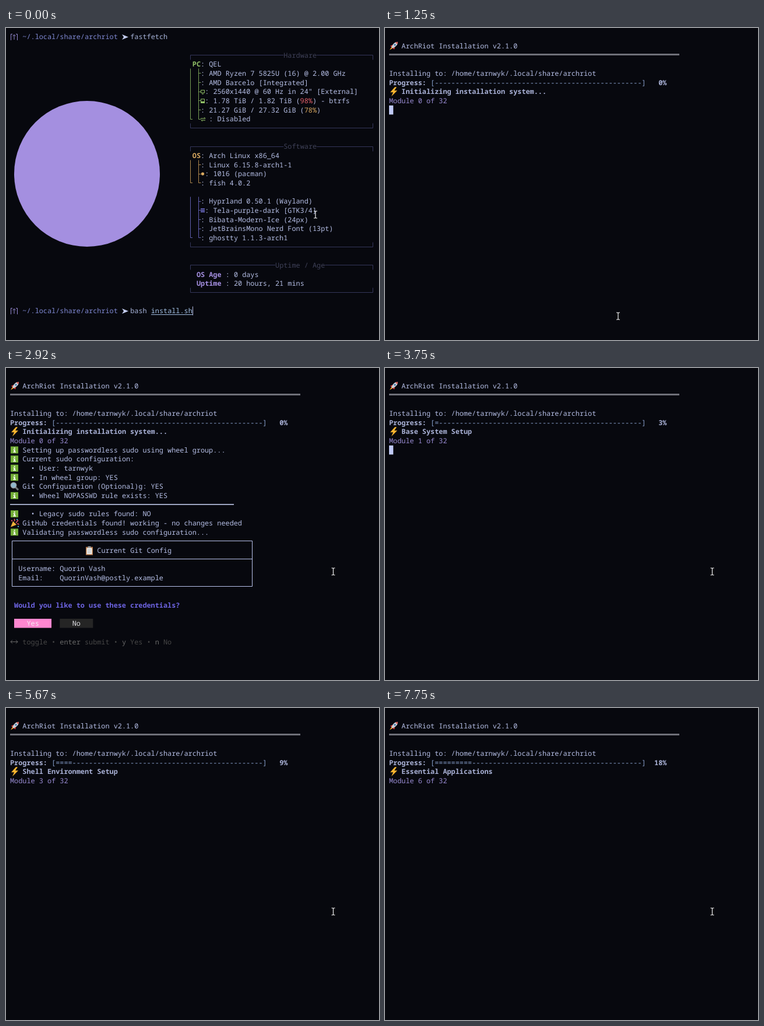
An HTML page that plays this animation: 640 px wide and 535 px high, repeating every 8 s.

```html
<!DOCTYPE html>
<html lang="en">
<head>
<meta charset="utf-8">
<title>Terminal installation</title>
<style>
html, body { margin: 0; width: 100%; height: 100%; overflow: hidden; background: #07080e; }
svg { display: block; width: 640px; height: 535px; }
text {
  font: 11.85px "Noto Sans Mono", "DejaVu Sans Mono", monospace;
  white-space: pre;
  text-rendering: geometricPrecision;
}
.bold { font-weight: 600; }
</style>
</head>
<body>
<svg id="stage" viewBox="0 0 640 535" xmlns="http://www.w3.org/2000/svg"></svg>
<script>
const LOOP = 8000;
const CELL = 7.11, LINE = 15.66;
const FG = '#b4bde4', STRONG = '#a9b1d6', PURPLE = '#a48fe0', BLUE = '#7f88d2';
const DIM = '#34365a', GREEN = '#94c468', ORANGE = '#d8a860', INDIGO = '#7674d8';

const colX = col => 7 + col * CELL;
const rowY = row => 15.2 + row * LINE;
const pixelY = row => Math.floor(rowY(row)) + 0.5;

// Drawing helpers, all on the character grid
const text = (col, row, str, fill = FG, bold = false) =>
  `<text x="${colX(col)}" y="${rowY(row) + 4.2}" fill="${fill}"${bold ? ' class="bold"' : ''}>${str}</text>`;
const rect = (x, y, w, h, fill) => `<rect x="${x}" y="${y}" width="${w}" height="${h}" fill="${fill}"/>`;
const line = (d, stroke, width = 1) => `<path d="${d}" fill="none" stroke="${stroke}" stroke-width="${width}"/>`;
const shape = (d, fill) => `<path d="${d}" fill="${fill}"/>`;
const at = (x, y, body) => `<g transform="translate(${x} ${y})">${body}</g>`;
const group = (id, body) => `<g id="${id}">${body}</g>`;

const icons = {
  rocket: shape('M2 8L6 6L5 11ZM9 14L10 10L5 11Z', '#d8433b') +
    shape('M15 1C10 1 7 4 4 10L6 12C12 9 15 6 15 1Z', '#cdd3da') +
    shape('M15 1L11 2L14 5Z', '#d8433b') +
    '<circle cx="10" cy="6" r="1.7" fill="#3c78a8"/>' +
    shape('M4 10L1 15L6 12Z', '#f7a531'),
  bolt: shape('M10 0L2 9H7L4 16L14 6H9L13 0Z', '#fbb62f'),
  info: rect(1, 2, 13, 12, '#72ad36') + rect(6.6, 4, 2, 2, '#fff') +
    shape('M5.5 7H8.7V11H10V12.3H5.3V11H6.6V8.2H5.5Z', '#fff'),
  search: line('M9.5 9.5L14 14', '#6e7478', 3) +
    '<circle cx="6" cy="6" r="4.6" fill="#8fb9cf" stroke="#9aa0a5" stroke-width="1.6"/>',
  party: shape('M1 15L5 5L11 11Z', '#f2b03a') +
    line('M7 5Q9 3 7 1M10 8L14 3M12 10Q14 8 15 11', '#e0526a', 1.5) +
    rect(2, 3, 2, 2, '#e0526a') + rect(11, 1, 2, 2, '#53b5d8') + rect(13, 13, 2, 2, '#53b5d8'),
  clipboard: rect(2, 2, 12, 14, '#b5784b') + rect(3.5, 4, 9, 10.5, '#f1f1ee') +
    rect(5.5, 1, 5, 3, '#9ba3a8') + line('M5 7H11M5 9.5H11M5 12H11', '#a9adb2')
};
const icon = (name, row, x = 7) => at(x, rowY(row) - 8, icons[name]);

function prompt(row, command) {
  const y = pixelY(row);
  return line(`M11 ${y - 5}H8.5V${y + 5.5}M17 ${y - 5}H19.5V${y + 5.5}M14 ${y + 4.5}V${y - 4}M11.5 ${y - 1.5}L14 ${y - 4}L16.5 ${y - 1.5}`, '#9488d0') +
    text(3, row, '~/.local/share/archriot', BLUE) +
    shape(`M199 ${y - 4.5}L210 ${y}L199 ${y + 4.5}L202 ${y}Z`, '#c4cdf0') + command;
}

function panel(title, top, bottom, col) {
  const y1 = pixelY(top), y2 = pixelY(bottom);
  return line(`M316.5 ${y1 + 8}V${y1}H${colX(col)}M${colX(col + title.length)} ${y1}H629.5V${y1 + 8}`, DIM) +
    line(`M316.5 ${y2 - 8}V${y2}H629.5V${y2 - 8}`, DIM) + text(col, top, title, '#3f4158');
}

function tree(first, last, color) {
  const top = pixelY(first) - 8, end = pixelY(last);
  let d = `M316.5 ${top}V${end}H320M330.5 ${top}V${end}`;
  for (let row = first; row <= last; row++) d += `M330.5 ${pixelY(row)}h4`;
  return `<g opacity="0.8">${line(d, color)}</g>`;
}

const entry = (row, value, shift = 0) =>
  text(46 + shift, row, ':') + text(48 + shift, row, value);
const tint = (str, fill) => `<tspan fill="${fill}">${str}</tspan>`;
const heading = (row, label, value, color) =>
  text(44, row, label, color, true) + entry(row, value);

function fetchScreen() {
  const y6 = rowY(6), y7 = rowY(7), y9 = rowY(9), y15 = rowY(15), y19 = rowY(19);
  const smallIcons =
    line(`M334.5 ${y6 - 2.5}h6v4.5h-6ZM336 ${y6 + 4}h3`, GREEN) +
    line(`M334.5 ${y7 - 3}h6v6.5h-6Z`, GREEN) + rect(334, y7 + 1, 7, 3, GREEN) +
    line(`M334 ${y9 - 1}h8l-2 -2M342 ${y9 + 2}h-7l2 2`, GREEN) +
    `<circle cx="337.5" cy="${y15}" r="2.6" fill="${ORANGE}"/>` +
    line(`M334 ${y19 - 2.5}h7M334 ${y19}h7M334 ${y19 + 2.5}h7`, INDIGO, 1.5);
  return prompt(0, text(29, 0, 'fastfetch', '#a8b4da')) +
    `<circle cx="139" cy="250" r="125" fill="${PURPLE}"/>` +
    panel('Hardware', 2, 10, 66) + heading(3, 'PC', 'QEL', GREEN) + tree(4, 9, GREEN) +
    entry(4, 'AMD Ryzen 7 5825U (16) @ 2.00 GHz') +
    entry(5, 'AMD Barcelo [Integrated]') +
    entry(6, '2560x1440 @ 60 Hz in 24" [External]', 1) +
    entry(7, `1.78 TiB / 1.82 TiB (${tint('98%', '#e6606a')}) - btrfs`, 1) +
    entry(8, `21.27 GiB / 27.32 GiB (${tint('78%', ORANGE)})`) +
    entry(9, 'Disabled', 2) +
    panel('Software', 12, 23, 66) + heading(13, 'OS', 'Arch Linux x86_64', ORANGE) + tree(14, 16, ORANGE) +
    entry(14, 'Linux 6.15.8-arch1-1') + entry(15, '1016 (pacman)', 1) + entry(16, 'fish 4.0.2') +
    tree(18, 22, INDIGO) +
    entry(18, 'Hyprland 0.50.1 (Wayland)') + entry(19, 'Tela-purple-dark [GTK3/4]', 1) +
    entry(20, 'Bibata-Modern-Ice (24px)') + entry(21, 'JetBrainsMono Nerd Font (13pt)') +
    entry(22, 'ghostty 1.1.3-arch1') + smallIcons +
    panel('Uptime / Age', 25, 28, 64) +
    text(45, 26, 'OS Age', PURPLE, true) + text(52, 26, ': 0 days') +
    text(45, 27, 'Uptime', PURPLE, true) + text(52, 27, ': 20 hours, 21 mins') +
    prompt(30, text(29, 30, 'bash', '#a8b4da') + text(34, 30, 'install.sh', '#a3c0e4') +
      line(`M249 ${pixelY(30) + 6}H320`, '#a3c0e4')) +
    group('typeBar', rect(320, rowY(30) - 7.5, 1, 15, FG));
}

function installScreen() {
  return icon('rocket', 1) + text(3, 1, 'ArchRiot Installation v2.1.0') +
    rect(7, 44, 498, 3, '#6f7079') +
    text(0, 4, 'Installing to: /home/tarnwyk/.local/share/archriot') +
    text(0, 5, 'Progress:', STRONG, true) +
    `<text id="bar" x="${colX(10)}" y="${rowY(5) + 4.2}" fill="#8aa3d0"></text>` +
    `<text id="percent" class="bold" x="${colX(64)}" y="${rowY(5) + 4.2}" fill="${STRONG}"></text>` +
    icon('bolt', 6) +
    `<text id="stepName" class="bold" x="${colX(3)}" y="${rowY(6) + 4.2}" fill="${STRONG}"></text>` +
    `<text id="count" x="7" y="${rowY(7) + 4.2}" fill="#988bd2"></text>`;
}

const logLine = (row, str, name = 'info') => icon(name, row) + text(3, row, str);
const button = (id, x, w) => `<rect id="${id}" x="${x}" y="430" width="${w}" height="15.6"/>`;

function help() {
  const key = '#686868', note = '#464646';
  const y = pixelY(29);
  return line(`M8 ${y}H20M11 ${y - 3}L8 ${y}L11 ${y + 3}M17 ${y - 3}L20 ${y}L17 ${y + 3}`, key) +
    text(3, 29, `toggle • ${tint('enter', key)} submit • ${tint('y', key)} Yes • ${tint('n', key)} No`, note);
}

// Log output, each part with the moment it is printed
const logParts = [
  [1670, logLine(8, 'Setting up passwordless sudo using wheel group...')],
  [1750, logLine(9, 'Current sudo configuration:') + logLine(10, '  • User: tarnwyk') +
    logLine(11, '  • In wheel group: YES')],
  [1830, logLine(13, '  • Wheel NOPASSWD rule exists: YES') + logLine(15, '  • Legacy sudo rules found: NO') +
    logLine(17, 'Validating passwordless sudo configuration...')],
  [1920, logLine(12, 'Git Configuration (Optional)g: YES', 'search') + rect(7, 233.2, 384, 1.6, '#c3cbed') +
    logLine(16, 'GitHub credentials found! working - no changes needed', 'party') +
    line('M10.5 296.5H422.5V374.5H10.5ZM10.5 327.5H422.5', '#b9c3ec') +
    icon('clipboard', 19, 135) + text(21, 19, 'Current Git Config') +
    text(2, 21, 'Username: Quorin Vash') + text(2, 22, 'Email:    QuorinVash@postly.example')],
  [2000, text(1, 25, 'Would you like to use these credentials?', '#6d64e2', true) +
    button('yes', 14, 64) + button('no', 92.3, 57) +
    text(4, 27, 'Yes', '#f4ecf4') + text(15, 27, 'No', '#dedee2') + help()]
];
const LOG_END = 3750, CLEAR = 1000;
const toggles = [2080, 2170, 2250, 2420, 2580, 2670, 2750, 2920, 3080, 3250];

// [start, module number, title]
const modules = [
  [0, 0, 'Initializing installation system...'],
  [3750, 1, 'Base System Setup'],
  [4170, 2, 'Base System Setup'],
  [4580, 3, 'Shell Environment Setup'],
  [6170, 4, 'Shell Environment Setup'],
  [6420, 5, 'Essential Applications'],
  [7330, 6, 'Essential Applications']
];
// Block cursor flips at each of these moments
const blinks = [80, 1670, 3750, 4330, 4920, 5080, 5420, 5670, 5920, 6170, 6670, 6920, 7080, 7330, 7580, 7750];
const mousePath = [[0, 531, 320], [1250, 400, 494], [1920, 561.5, 349], [LOOP, 561.5, 349]];

const stage = document.getElementById('stage');
stage.innerHTML = rect(0, 0, 640, 535, '#07080e') +
  group('fetch', fetchScreen()) +
  group('install', installScreen()) +
  logParts.map(([, body], i) => group('log' + i, body)).join('') +
  `<rect id="block" x="7" width="7.2" height="15.6" fill="#c0caf5"/>` +
  group('mouse', line('M-3 -6H-1L0 -5L1 -6H3M0 -5V5M-3 6H-1L0 5L1 6H3', '#f2f2f2', 1.2));

const $ = id => document.getElementById(id);
const show = (id, on) => $(id).setAttribute('visibility', on ? 'inherit' : 'hidden');
const countPast = (times, t) => times.filter(time => time <= t).length;

function mouseAt(t) {
  const i = mousePath.findIndex(([time]) => time > t);
  const [t0, x0, y0] = mousePath[i - 1], [t1, x1, y1] = mousePath[i];
  const p = (t - t0) / (t1 - t0), e = p * p * (3 - 2 * p);
  return [x0 + (x1 - x0) * e, y0 + (y1 - y0) * e];
}

function render(t) {
  const installing = t >= CLEAR;
  show('fetch', !installing);
  show('install', installing);
  show('typeBar', t < 80);

  const [, number, title] = modules.filter(([start]) => start <= t).pop();
  const percent = Math.floor(number * 100 / 32), done = Math.floor(percent / 2);
  $('bar').textContent = `[${'='.repeat(done)}${'-'.repeat(50 - done)}]`;
  $('percent').textContent = `${percent}%`.padStart(3);
  $('stepName').textContent = title;
  $('count').textContent = `Module ${number} of 32`;

  logParts.forEach(([start], i) => show('log' + i, t >= start && t < LOG_END));
  const yes = countPast(toggles, t) % 2 === 0;
  $('yes').setAttribute('fill', yes ? '#ff87d0' : '#252525');
  $('no').setAttribute('fill', yes ? '#252525' : '#ff87d0');

  show('block', countPast(blinks, t) % 2 === 1);
  $('block').setAttribute('y', rowY(installing ? 8 : 31) - 7.7);
  $('mouse').setAttribute('transform', `translate(${mouseAt(t).join(' ')})`);
}

function tick(now) {
  render(now % LOOP);
  requestAnimationFrame(tick);
}
render(0);
requestAnimationFrame(tick);
</script>
</body>
</html>
```
